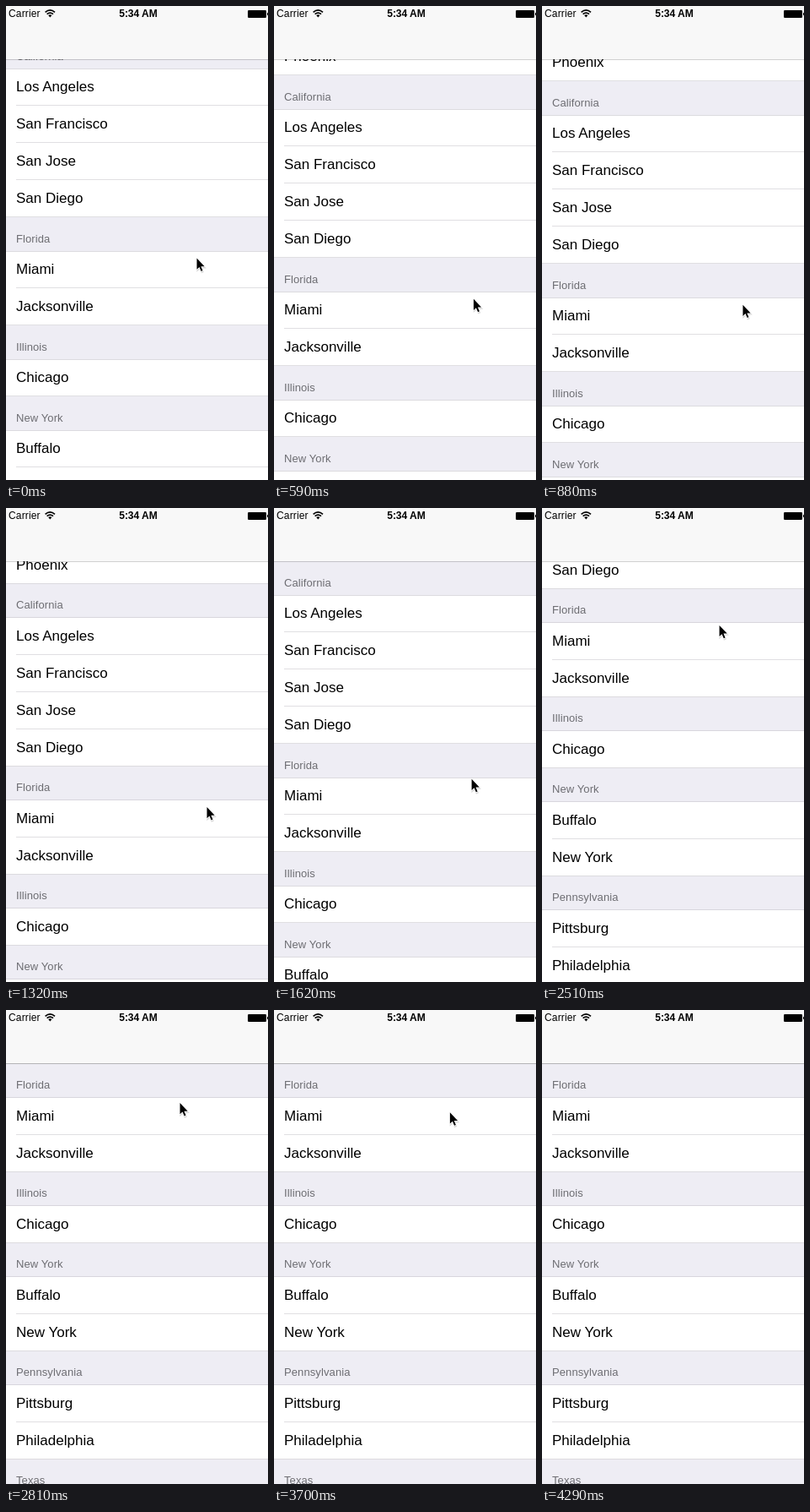
Animation of 311 by 561 pixels, one loop 4.59 s. Source, as an HTML page:

```html
<!DOCTYPE html>
<html lang="en">
<head>
<meta charset="utf-8">
<title>City list</title>
<style>
  html, body { margin: 0; width: 100%; height: 100%; overflow: hidden; background: #fff; }
  svg { display: block; width: 100vw; height: 100vh; }
  text { font-family: "Liberation Sans", Arial, sans-serif; }
  .city { font-size: 17px; fill: #000; }
  .state { font-size: 13px; fill: #6d6d72; letter-spacing: .1px; }
  .status { font-size: 12px; fill: #000; }
</style>
</head>
<body>
<svg viewBox="0 0 311 561" preserveAspectRatio="none">
  <defs>
    <path id="arrow" d="M0 0V13.2L3 10.4L5.2 15.4L7 14.6L4.9 9.7H9.2Z"/>
  </defs>
  <rect width="311" height="561" fill="#fff"/>
  <g id="list"></g>

  <rect width="311" height="63" fill="#f8f8f8"/>
  <rect y="63" width="311" height="1" opacity=".18"/>

  <text class="status" x="3" y="13.3" letter-spacing=".15">Carrier</text>
  <g fill="none" stroke="#000" stroke-width="1.7">
    <path d="M46.6 7.4Q52.3 2.4 58 7.4"/>
    <path d="M48.6 9.7Q52.3 6.5 56 9.7"/>
  </g>
  <path d="M50.2 11.1Q52.3 9.5 54.4 11.1L52.3 13.4Z"/>
  <text class="status" x="157" y="13.3" font-weight="bold" text-anchor="middle">5:34 AM</text>
  <rect x="287" y="5" width="22" height="9" rx="1.2"/>
  <path d="M310 7.8Q311.4 8 311.4 9.5T310 11.2Z"/>

  <g id="cursor">
    <use href="#arrow" x=".5" y="1.5" stroke="#000" stroke-width="1.4" opacity=".15"/>
    <use href="#arrow" stroke="#fff" stroke-width="1.6" stroke-linejoin="round" paint-order="stroke"/>
  </g>
</svg>
<script>
const LOOP = 4590, STEP = 148.2, LEAD = 17, ROW = 44, HEAD = 40;

const sections = [
  ['Arizona', 'Phoenix'],
  ['California', 'Los Angeles', 'San Francisco', 'San Jose', 'San Diego'],
  ['Florida', 'Miami', 'Jacksonville'],
  ['Illinois', 'Chicago'],
  ['New York', 'Buffalo', 'New York'],
  ['Pennsylvania', 'Pittsburg', 'Philadelphia'],
  ['Texas']
];

const easeIn = n => p => p ** n;
const easeOut = n => p => 1 - (1 - p) ** n;

// A pose is [top of the Florida header, pointer x, pointer y]
const first = [250.5, 226.5, 298.5];
const moves = [
  { from: 135, to: 1030, ease: easeOut(3), pose: [306, 238.5, 354] },      // drag down
  { from: 1317, to: 1910, ease: easeIn(1.5), pose: [231, 227.5, 260] },    // drag up
  { from: 1910, to: 2799, ease: easeOut(1.5), pose: [64, 206.5, 110] },    // snap to a header
  { from: 2799, to: 3243, ease: easeOut(1), pose: [64, 205.5, 104] },
  { from: 3550, to: 4280, ease: easeIn(2), pose: [64, 300, 590] }          // pointer leaves
];

const list = document.getElementById('list');
const cursor = document.getElementById('cursor');

function add(tag, attrs, content = '') {
  const el = document.createElementNS('http://www.w3.org/2000/svg', tag);
  for (const name in attrs) el.setAttribute(name, attrs[name]);
  el.textContent = content;
  list.appendChild(el);
}

const line = (x, y) => add('rect', { x, y, width: 311 - x, height: .5, fill: '#c0bfc5' });
const label = (kind, y, content) => add('text', { class: kind, x: 12, y }, content);

// Builds the list with the Florida header at y = 0
function build() {
  const height = s => HEAD + ROW * (s.length - 1);
  let y = -height(sections[0]) - height(sections[1]);
  for (const [state, ...cities] of sections) {
    add('rect', { x: 0, y: y - .5, width: 311, height: HEAD + .5, fill: '#eeedf4' });
    line(0, y - 1);
    line(0, y + HEAD - .5);
    label('state', y + 29, state);
    y += HEAD;
    cities.forEach((city, i) => {
      label('city', y + 26.6, city);
      if (i < cities.length - 1) line(12, y + ROW - 1);
      y += ROW;
    });
  }
}

function poseAt(t) {
  let pose = first;
  for (const m of moves) {
    const p = Math.min(1, Math.max(0, (t - m.from) / (m.to - m.from)));
    const k = m.ease(p);
    pose = pose.map((v, i) => v + (m.pose[i] - v) * k);
  }
  return pose;
}

function render(t) {
  // The screen refreshes in even steps
  const tick = Math.floor((t + LEAD) / STEP) * STEP - LEAD;
  const [top, x, y] = poseAt(t < 279 ? 0 : tick);
  list.setAttribute('transform', `translate(0 ${Math.round(top * 2) / 2})`);
  cursor.setAttribute('transform', `translate(${x} ${y})`);
}

build();
const start = performance.now();
function loop() {
  render((performance.now() - start) % LOOP);
  requestAnimationFrame(loop);
}
render(0);
requestAnimationFrame(loop);
</script>
</body>
</html>
```
